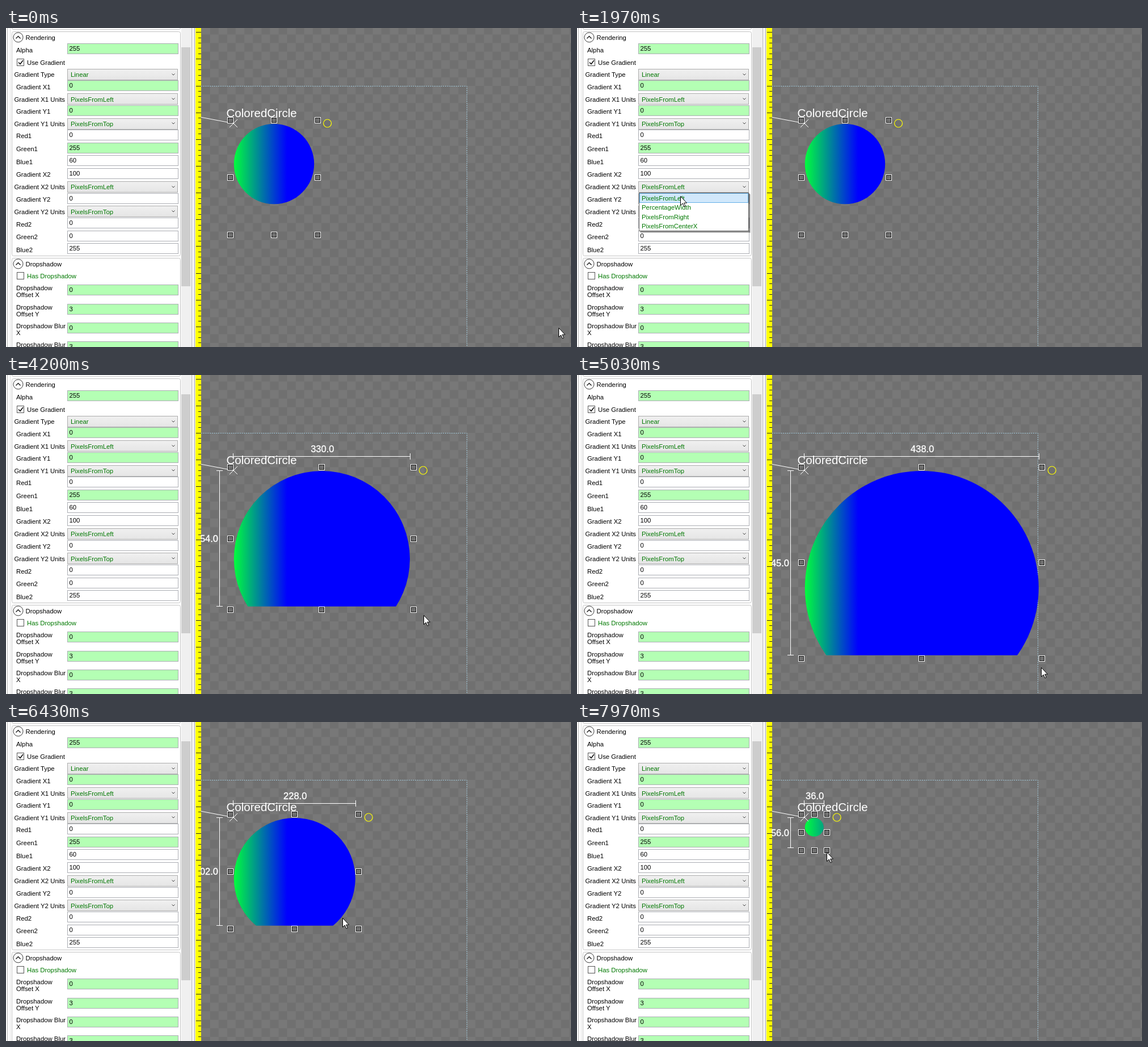
Recreate the animation shown at these times as an HTML page. Size 996 px wide and 562 px high, loop 8 s.

```html
<!DOCTYPE html>
<html lang="en">
<head>
<meta charset="utf-8">
<title>Gradient circle editor</title>
<style>
html, body { margin: 0; width: 100%; height: 100%; overflow: hidden; background: #fff; }
svg { display: block; width: 996px; height: 562px; font-family: "Liberation Sans", Arial, sans-serif; }
.ui text { font-size: 11.35px; }
.box { fill: #fff; stroke: #abadb3; }
.set { fill: #b4ffb4; }
.combo { fill: url(#button); stroke: #acacac; }
.combo.hover { fill: url(#buttonHot); stroke: #7eb4ea; }
.ui .green { fill: #007800; }
.group { fill: none; stroke: #c4c4c4; }
.line { fill: none; stroke: #fff; }
.dim { font-size: 16.5px; fill: #fff; stroke: #fff; stroke-width: .35; }
</style>
</head>
<body>
<svg id="stage" viewBox="0 0 996 562">
  <defs>
    <linearGradient id="button" x2="0" y2="1"><stop stop-color="#f0f0f0"/><stop offset="1" stop-color="#e5e5e5"/></linearGradient>
    <linearGradient id="buttonHot" x2="0" y2="1"><stop stop-color="#ecf4fc"/><stop offset="1" stop-color="#dcecfc"/></linearGradient>
    <linearGradient id="fill" gradientUnits="userSpaceOnUse" x1="401.2" y1="0" x2="495.5" y2="0">
      <stop stop-color="#00ff3c"/><stop offset="1" stop-color="#0000ff"/>
    </linearGradient>
    <pattern id="checker" patternUnits="userSpaceOnUse" x="58" y="102" width="30.18" height="30.18">
      <rect width="30.18" height="30.18" fill="#707070"/>
      <path d="M0 0h15.09v30.18h15.09v-15.09h-30.18z" fill="#787878"/>
    </pattern>
    <clipPath id="view"><rect x="343.5" width="652.5" height="562"/></clipPath>
    <clipPath id="crop"><rect id="cropBox" x="395" y="160" width="600"/></clipPath>
    <clipPath id="popupArea"><rect x="105" y="290" width="210" height="80"/></clipPath>
  </defs>
  <rect width="996" height="562" fill="#fff"/>
  <g id="panel" class="ui"></g>
  <g id="ruler"></g>
  <rect x="344" width="652" height="562" fill="url(#checker)"/>
  <g clip-path="url(#view)">
    <path d="M344 102.5H812.5V562" fill="none" stroke="#a4d0e4" stroke-dasharray="1.886"/>
    <g clip-path="url(#crop)"><circle id="disc" fill="url(#fill)"/></g>
    <text x="388.5" y="156.5" font-size="20.5" fill="#fff">ColoredCircle</text>
    <path class="line" d="M340 156.5L401 168M394 161l14 14M408 161l-14 14"/>
    <g id="dims">
      <path id="dimLines" class="line"/>
      <text id="wide" class="dim" y="136" text-anchor="middle"></text>
      <text id="high" class="dim" x="374" text-anchor="end"></text>
    </g>
    <g id="handles"></g>
    <circle id="ring" cy="168" r="7" fill="none" stroke="#ff0" stroke-width="1.2"/>
  </g>
  <g clip-path="url(#popupArea)"><g id="popup" class="ui"></g></g>
  <path id="arrow" d="M.5 .5V16.5L4.2 13L7 19L9.3 18L6.6 12.2H11.5Z" fill="#fff" stroke="#000"/>
  <path id="resize" d="M-8 -8h7l-2.4 2.4l9 9L8 1v7H1l2.4-2.4l-9-9L-8-1z" fill="#fff" stroke="#000"/>
</svg>
<script>
const $ = id => document.getElementById(id);

function add(parent, tag, attrs, text) {
  const el = document.createElementNS("http://www.w3.org/2000/svg", tag);
  set(el, attrs);
  if (text !== undefined) el.textContent = text;
  return parent.appendChild(el);
}
function set(el, attrs) {
  for (const k in attrs) el.setAttribute(k, attrs[k]);
}
// Centre of the pixel that holds v
const snap = v => Math.floor(v) + .5;

// ---- property panel ----
const panel = $("panel");
const label = (x, y, text, cls = "") => add(panel, "text", { x, y: y + 4, class: cls }, text);
const path = (d, stroke = "#333") => add(panel, "path", { d, fill: "none", stroke });

function field(y, name, top, value, isSet) {
  label(18, y, name);
  input(top, value, isSet);
}
function input(top, value, isSet) {
  add(panel, "rect", { x: 108.5, y: top + .5, width: 195, height: 18, class: isSet ? "box set" : "box" });
  label(111.5, top + 9, value);
}
function combo(y, name, value) {
  label(14.5, y, name);
  const el = add(panel, "rect", { x: 108.5, y: snap(y - 9.8), width: 194, height: 19, class: "combo" });
  label(114, y, value, "green");
  path(`M292.5 ${snap(y - 2)}l2.5 2.5l2.5 -2.5`, "#404040");
  return el;
}
function group(top, height, name) {
  add(panel, "rect", { x: 10.5, y: top + .5, width: 297, height, rx: 3, class: "group" });
  add(panel, "circle", { cx: 21.5, cy: top + 10.5, r: 8.5, fill: "#fff", stroke: "#333" });
  add(panel, "path", { d: `M17.5 ${top + 12.5}l4 -4l4 4`, fill: "none", stroke: "#222", "stroke-width": 1.5 });
  label(34.5, top + 10.5, name);
}
function check(y, name, on, cls) {
  add(panel, "rect", { x: 19.5, y: y - 6, width: 12, height: 12, fill: "#fff", stroke: "#555" });
  if (on) add(panel, "path", { d: `M22 ${y}l3 3l5 -6.5`, fill: "none", stroke: "#111", "stroke-width": 1.6 });
  label(37, y, name, cls);
}

path("M2.5 0V562", "#b4b4b4");
path("M7.5 0V562", "#dedede");
path("M10.5 0Q10.5 2.5 13 2.5H305Q307.5 2.5 307.5 0", "#c4c4c4");
add(panel, "rect", { x: 309, width: 17, height: 562, fill: "#f0f0f0" });
const thumb = add(panel, "rect", { x: 309, y: 34, width: 16, height: 421, fill: "#cdcdcd" });
add(panel, "rect", { x: 326, width: 8, height: 562, fill: "#f4f4f4" });
path("M327.5 0V562", "#b8b8b8");
path("M332.5 0V562", "#a8a8a8");

group(6, 395, "Rendering");
field(38.5, "Alpha", 27, "255", true);
check(60.5, "Use Gradient", true);
combo(82, "Gradient Type", "Linear");
field(103.5, "Gradient X1", 92, "0", true);
combo(125.5, "Gradient X1 Units", "PixelsFromLeft");
field(147, "Gradient Y1", 136, "0", true);
combo(168.8, "Gradient Y1 Units", "PixelsFromTop");
field(190, "Red1", 179, "0");
field(213, "Green1", 202, "255", true);
field(235.7, "Blue1", 224, "60");
field(258.3, "Gradient X2", 247, "100");
const unitsX2 = combo(280.3, "Gradient X2 Units", "PixelsFromLeft");
field(302, "Gradient Y2", 291, "0");
combo(323.7, "Gradient Y2 Units", "PixelsFromTop");
field(345.5, "Red2", 334, "0");
field(368, "Green2", 357, "0");
field(391, "Blue2", 379, "255");

group(405, 200, "Dropshadow");
check(436.5, "Has Dropshadow", false, "green");
[["Offset X", "0", 452], ["Offset Y", "3", 486]].forEach(([name, value, top]) => {
  label(18, top + 6, "Dropshadow");
  label(18, top + 18, name);
  input(top, value, true);
});
["0", "3"].forEach((value, i) => {
  const top = 519 + i * 33.5;
  label(18, top + 5.5, "Dropshadow Blur");
  label(18, top + 18, "XY"[i]);
  input(Math.floor(top), value, true);
});

// ---- unit list ----
const popup = $("popup");
add(popup, "rect", { x: 112, y: 293, width: 194, height: 68, fill: "#000", opacity: .18 });
add(popup, "rect", { x: 111, y: 292, width: 194, height: 68, fill: "#000", opacity: .3 });
add(popup, "rect", { x: 109.5, y: 290.5, width: 193, height: 67, fill: "#fff", stroke: "#646464" });
add(popup, "rect", { x: 110.5, y: 291.5, width: 191, height: 16, fill: "#d1e8fb", stroke: "#66b0e8" });
["PixelsFromLeft", "PercentageWidth", "PixelsFromRight", "PixelsFromCenterX"].forEach((name, i) =>
  add(popup, "text", { x: 114, y: 303.5 + i * 16.6, class: "green" }, name));

// ---- ruler ----
const ruler = $("ruler");
add(ruler, "rect", { x: 334, width: 10, height: 562, fill: "#ff0" });
for (let i = -10; i < 49; i++) {
  const len = i % 5 ? 5 : 9;
  add(ruler, "path", { d: `M${344 - len} ${snap(102 + i * 9.43)}h${len}`, stroke: "#222" });
}

// ---- canvas selection ----
const handles = Array.from({ length: 8 }, () => {
  const g = add($("handles"), "g", {});
  add(g, "rect", { x: -5, y: -5, width: 10, height: 10, fill: "#707070", stroke: "#fff" });
  add(g, "rect", { x: -4, y: -4, width: 8, height: 8, fill: "none", stroke: "#111" });
  return g;
});

// ---- motion ----
const LOOP = 8000, LEFT = 401.2, TOP = 168.3, ZOOM = .943, LAG = 95;

// time, width, height of the circle in its own units
const sizes = [
  [3625, 151, 202], [3900, 236, 229], [4200, 330, 254], [4330, 357, 265], [4750, 460, 304],
  [5030, 438, 345], [5125, 437, 359], [5190, 443, 368], [5480, 482, 400], [5620, 477, 398],
  [6000, 406, 328], [6430, 228, 202], [6525, 199, 179], [6830, 143, 140], [7250, 83, 92],
  [7670, 52, 65], [7940, 36, 56]
];
// time, x, y of the pointer before dragging
const moves = [
  [30, 974, 528], [200, 860, 484], [520, 420, 340], [830, 236, 285], [970, 174, 285],
  [1530, 174, 285], [1830, 181, 296], [1970, 182, 296], [2400, 182, 296],
  [2880, 610, 397], [3000, 598, 391], [3200, 549, 367]
];

// Monotone cubic interpolation of one column
function along(keys, t, col) {
  const last = keys.length - 1;
  if (t <= keys[0][0]) return keys[0][col];
  if (t >= keys[last][0]) return keys[last][col];
  let i = 0;
  while (keys[i + 1][0] < t) i++;
  const slope = k => (keys[k + 1][col] - keys[k][col]) / (keys[k + 1][0] - keys[k][0]);
  const tangent = k => {
    if (k === 0 || k === last) return 0;
    const a = slope(k - 1), b = slope(k);
    return a * b <= 0 ? 0 : 2 * a * b / (a + b);
  };
  const [p, q] = [keys[i], keys[i + 1]];
  const d = q[0] - p[0], u = (t - p[0]) / d, v = 1 - u;
  return p[col] * v * v * (1 + 2 * u) + q[col] * u * u * (1 + 2 * v)
    + d * u * v * (tangent(i) * v - tangent(i + 1) * u);
}

const show = (el, on) => el.setAttribute("visibility", on ? "visible" : "hidden");
const moveTo = (el, x, y) => el.setAttribute("transform", `translate(${x} ${y})`);

function draw(t) {
  const w = Math.round(along(sizes, t, 1)), h = Math.round(along(sizes, t, 2));
  const right = LEFT + w * ZOOM, bottom = TOP + h * ZOOM;
  const midX = (LEFT + right) / 2, midY = (TOP + bottom) / 2, r = w * ZOOM / 2;

  set($("disc"), { cx: midX + .1, cy: TOP + r + .1, r: r - .5 });
  set($("cropBox"), { height: bottom - 160 });

  const xs = [395, midX, right + 5.7].map(snap);
  const ys = [162, midY, bottom + 5.5].map(snap);
  let n = 0;
  for (let i = 0; i < 9; i++) if (i !== 4) moveTo(handles[n++], xs[i % 3], ys[Math.floor(i / 3)]);
  set($("ring"), { cx: right + 23 });

  show($("dims"), t >= 3130);
  const rx = snap(right), by = snap(bottom);
  set($("dimLines"), { d: `M400.5 143.5H${rx}M400.5 138v11M${rx} 138v11M376.5 168.5V${by}M371 168.5h11M371 ${by}h11` });
  $("wide").textContent = w.toFixed(1);
  set($("wide"), { x: midX + 1 });
  $("high").textContent = h.toFixed(1);
  set($("high"), { y: midY + 5.8 });

  const drag = t >= 3530;
  const px = drag ? LEFT + ZOOM * along(sizes, t + LAG, 1) + 4.8 : along(moves, t, 1);
  const py = drag ? TOP + ZOOM * along(sizes, t + LAG, 2) + 7.8 : along(moves, t, 2);
  const sizing = t >= 3200 && !drag;
  moveTo($("arrow"), Math.round(px), Math.round(py));
  moveTo($("resize"), 549.5, 369);
  show($("arrow"), !sizing);
  show($("resize"), sizing);

  set(thumb, { fill: px > 308 && px < 326 ? "#a6a6a6" : "#cdcdcd" });
  const over = px > 109 && px < 303 && py > 270 && py < 290;
  unitsX2.classList.toggle("hover", over && t < 1560);

  const open = t >= 1530 && t < 2400;
  show(popup, open);
  const u = Math.min(1, (t - 1530) / 270);
  moveTo(popup, 0, open ? -72 * (1 - u) ** 2 : 0);
}

const start = performance.now();
function tick() {
  draw((performance.now() - start) % LOOP);
  requestAnimationFrame(tick);
}
draw(0);
requestAnimationFrame(tick);
</script>
</body>
</html>
```
